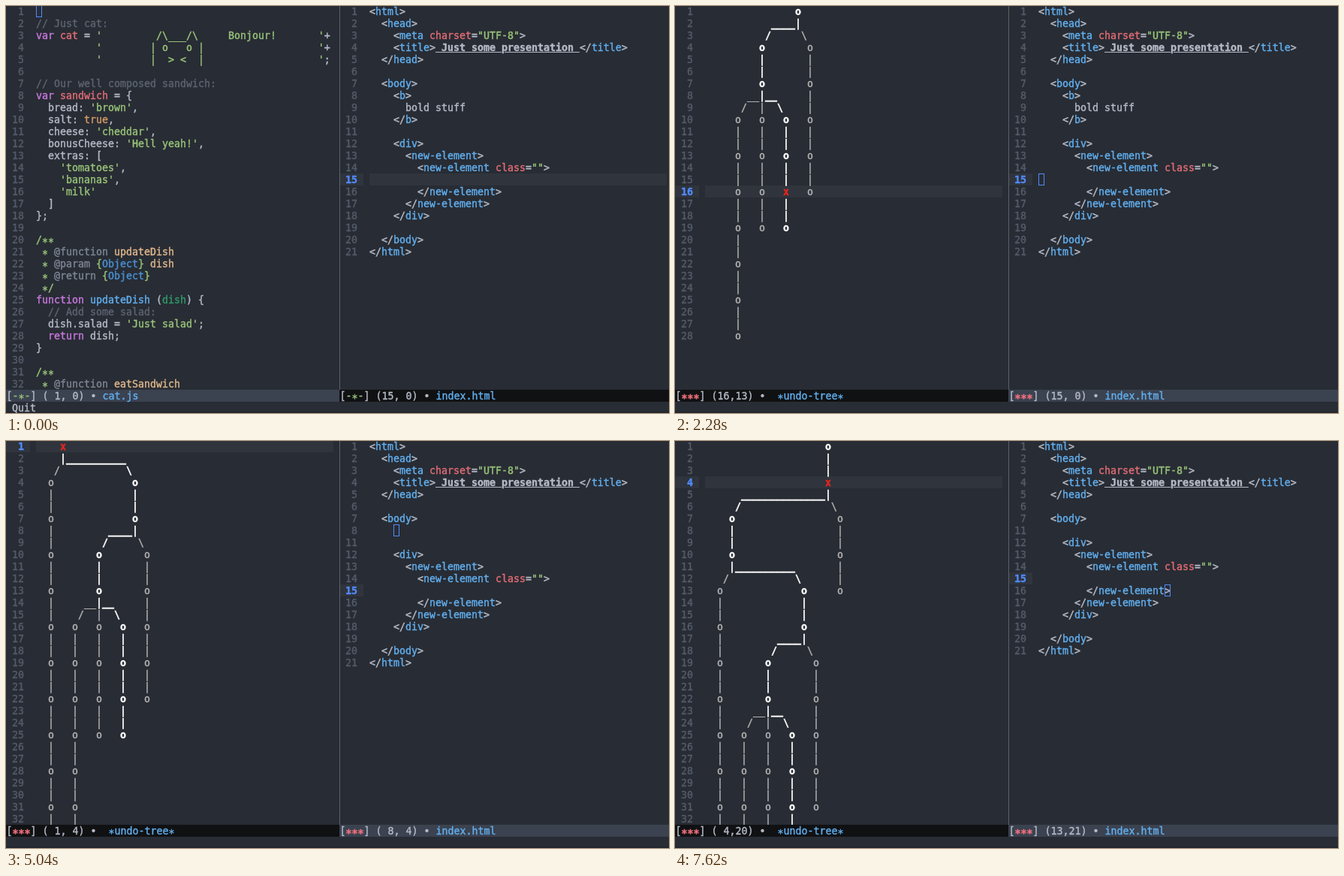
Recreate the animation shown at these times as an HTML page. Size 883 px wide and 542 px high, loop 8000 ms.

```html
<!DOCTYPE html>
<html lang="en">
<head>
<meta charset="UTF-8">
<title>Undo tree</title>
<style>
html, body { margin: 0; width: 100%; height: 100%; overflow: hidden; background: #282c34; }
#stage { position: relative; width: 883px; height: 542px; overflow: hidden; background: #282c34; }
pre, div div { position: absolute; margin: 0; box-sizing: border-box; }
pre {
  margin-top: 1px;
  font: 13.29px/16px "DejaVu Sans Mono", monospace;
  -webkit-text-stroke: 0.4px currentColor;
  font-variant-ligatures: none;
  color: #b4bac6;
}
i { position: relative; top: 3px; font-style: normal; }
.num { color: #535b69; }
.tree { color: #b3b3b3; }
.line { background: #2f343d; }
.on { background: #101113; }
.off { background: #3b4250; }
.rule { background: #5b606b; }
.edge { background: #22262d; }
.solid { background: #528bff; }
.hollow { border: 1px solid #528bff; }
.c { color: #5c6370; }
.k { color: #c678dd; }
.r { color: #e06c75; }
.R { color: #f0717c; font-weight: bold; }
.g { color: #98c379; }
.o { color: #d19a66; }
.d { color: #7d8594; }
.y { color: #dfb78c; }
.b { color: #4a8fd0; }
.f { color: #61afef; }
.p { color: #2f9a68; }
.u { font-weight: bold; text-decoration: underline; }
.n { color: #528bff; font-weight: bold; }
.w { color: #fff; font-weight: bold; }
.x { color: #e5261f; font-weight: bold; }
</style>
</head>
<body>
<div id="stage"></div>
<script>
// ~Xtext~ colours the text with class X
const SCRIPT = String.raw`
~c// Just cat:~
~kvar~ ~rcat~ = ~g'         /\___/\     Bonjour!       '~+
          ~g'        | o   o |                   '~+
          ~g'        |  > <  |                   '~;

~c// Our well composed sandwich:~
~kvar~ ~rsandwich~ = {
  bread: ~g'brown'~,
  salt: ~otrue~,
  cheese: ~g'cheddar'~,
  bonusCheese: ~g'Hell yeah!'~,
  extras: [
    ~g'tomatoes'~,
    ~g'bananas'~,
    ~g'milk'~
  ]
};

~g/**~
 ~g*~ ~d@function~ ~yupdateDish~
 ~g*~ ~d@param~ ~g{~~bObject~~g}~ ~ydish~
 ~g*~ ~d@return~ ~g{~~bObject~~g}~
 ~g*/~
~kfunction~ ~fupdateDish~ (~pdish~) {
  ~c// Add some salad:~
  dish.salad = ~g'Just salad'~;
  ~kreturn~ dish;
}

~g/**~
 ~g*~ ~d@function~ ~yeatSandwich~`;

const PAGE_TOP = `<html>
  <head>
    <meta charset="UTF-8">
    <title>~u Just some presentation ~</title>
  </head>

  <body>`.split('\n');

const PAGE_END = `
    <div>
      <new-element>
        <new-element class="">

        </new-element>
      </new-element>
    </div>

  </body>
</html>`.split('\n');

const LOOP = 8000, ROWS = 32;
const OPEN = '    <b>', CLOSE = '    </b>';

// Tree drawing on a character grid
let grid;

function put(row, col, text, cls = '') {
  if (row > ROWS) return;
  const line = grid[row - 1] ||= [];
  [...text].forEach((ch, i) => line[col + i] = cls ? `~${cls}${ch}~` : ch);
}

function chain(col, from, to, cls) {
  for (let r = from; r <= to; r++) put(r, col, (r - from) % 3 ? '|' : 'o', cls);
}

function lowTree(r, c = 0) {
  put(r + 1, c + 11, '____|', 'w');
  put(r + 2, c + 10, '/', 'w');
  put(r + 2, c + 16, '\\');
  chain(c + 9, r + 3, r + 6, 'w');
  chain(c + 17, r + 3, r + 15);
  put(r + 7, c + 7, '__');
  put(r + 7, c + 9, '|__', 'w');
  put(r + 8, c + 6, '/');
  put(r + 8, c + 9, '|');
  put(r + 8, c + 12, '\\', 'w');
  chain(c + 5, r + 9, r + 27);
  chain(c + 9, r + 9, r + 18);
  chain(c + 13, r + 9, r + 18, 'w');
}

function midTree(r) {
  put(r + 1, 4, '|' + '_'.repeat(10), 'w');
  put(r + 2, 3, '/');
  put(r + 2, 15, '\\', 'w');
  chain(2, r + 3, ROWS);
  chain(16, r + 3, r + 6, 'w');
  lowTree(r + 6, 1);
}

function highTree(r) {
  put(r + 1, 6, '_'.repeat(14) + '|', 'w');
  put(r + 2, 5, '/', 'w');
  put(r + 2, 21, '\\');
  chain(4, r + 3, r + 6, 'w');
  chain(22, r + 3, r + 9);
  midTree(r + 6);
}

const low = { draw: lowTree, col: 15 };
const mid = { draw: midTree, col: 4 };
const high = { draw: highTree, col: 20 };

function treeLines({ tree, top, mark }) {
  grid = [];
  tree.draw(top);
  chain(tree.col, 1, top, 'w');
  put(...mark, 'x', 'x');
  return grid.map(line => Array.from(line, ch => ch || ' ').join(''));
}

// Timeline: body = lines inside <body>, mark = x in the tree, point = cursor in the page
const full = [OPEN, '      bold stuff', CLOSE];
const step = (time, tree, top, mark, body, point, flag = '~R***~') =>
  ({ time, tree, top, mark, body, point, flag });
const states = [
  { time: 0, body: full, point: [15, 0], flag: '~g-*-~', quit: true },
  { time: 480, body: full, point: [15, 0], flag: '~g-*-~', quit: true, lit: true },
  { time: 780, body: full, point: [15, 0], flag: '~g-*-~', lit: true },
  step(960, low, 1, [19, 13], full, [15, 0], '~g-*-~'),
  step(2280, low, 1, [16, 13], full, [15, 0]),
  step(2580, low, 1, [13, 13], [OPEN, '', CLOSE], [9, 6]),
  step(2850, low, 1, [10, 13], ['    <>', '', CLOSE], [8, 5]),
  step(3000, low, 1, [7, 9], ['    <>', '', '    </>'], [8, 5]),
  step(3990, low, 1, [4, 9], ['    <'], [8, 4]),
  step(4380, low, 1, [1, 15], [''], [8, 4]),
  step(4650, low, 4, [1, 15], ['    <'], [8, 4]),
  step(5040, mid, 1, [1, 4], [''], [8, 4]),
  step(5430, mid, 4, [1, 4], [], [7, 8]),
  step(5940, high, 1, [1, 20], [], [11, 28]),
  step(6630, high, 4, [1, 20], [], [11, 29]),
  step(7620, high, 4, [4, 20], [], [13, 21]),
];

// Rendering
const rowY = row => 16 * row - 17;
const colour = s => s.replace(/~(.)(.*?)~/g, '<span class="$1">$2</span>').replace(/\*/g, '<i>*</i>');
const escape = s => s.replace(/</g, '&lt;');
const markup = s => escape(s)
  .replace(/(\w+)=("[^"]*")/g, '~r$1~=~g$2~')
  .replace(/(&lt;\/?)([\w-]+)/g, '$1~f$2~');
const text = (x, y, s, cls = '') =>
  `<pre class="${cls}" style="left:${x}px;top:${y}px">${colour(s)}</pre>`;
const box = (x, y, w, h, cls) =>
  `<div class="${cls}" style="left:${x}px;top:${y}px;width:${w}px;height:${h}px"></div>`;
const cursor = (x, [row, col], cls) => box(x + 8 * col, rowY(row), 8, 16, cls);
const lines = (x, list, cls) => list.map((s, i) => text(x, rowY(i + 1), s, cls)).join('');
const pad = n => String(n).padStart(2);
const numbers = (x, list, current) =>
  lines(x, list.map(n => n === current ? `~n${pad(n)}~` : pad(n)), 'num');
const count = (n, first = 1) => Array.from({ length: n }, (_, i) => first + i);
const status = (x, w, active, flag, [row, col], name) =>
  box(x, 511, w, 16, active ? 'on' : 'off') +
  text(x + 0.5, 511, `[${flag}] (${pad(row)},${pad(col)}) • ${name}`);

function leftPane(s) {
  if (!s.tree) {
    return numbers(8, count(ROWS)) + lines(40, escape(SCRIPT).split('\n')) +
      cursor(40, [1, 0], 'hollow') +
      status(0, 444, false, '~g-*-~', [1, 0], '~fcat.js~');
  }
  const list = treeLines(s), y = rowY(s.mark[0]);
  return box(0, y, 32, 16, 'line') + box(40, y, 396, 16, 'line') +
    numbers(8, count(list.length), s.mark[0]) + lines(40, list, 'tree') +
    status(0, 444, true, '~R***~', s.mark, ' ~f*undo-tree*~');
}

function rightPane(s) {
  const list = [...PAGE_TOP, ...s.body, ...PAGE_END];
  const labels = [...count(7 + s.body.length), ...count(11, 11)];
  const y = rowY(labels.indexOf(15) + 1);
  const kind = s.tree ? 'hollow' : s.lit ? 'solid' : '';
  return box(445, y, 31, 16, 'line') + (s.tree ? '' : box(484, y, 396, 16, 'line')) +
    numbers(452, labels, 15) + lines(484, list.map(markup)) +
    (kind && cursor(484, s.point, kind)) +
    status(444, 439, !s.tree, s.flag, s.point, '~findex.html~');
}

const stage = document.getElementById('stage');
let shown;

function frame() {
  const time = performance.now() % LOOP;
  const state = states.findLast(s => s.time <= time);
  if (state !== shown) {
    shown = state;
    stage.innerHTML = leftPane(state) + rightPane(state) +
      box(444, 0, 1, 511, 'rule') + box(0, 540, 883, 2, 'edge') +
      (state.quit ? text(8, 527, 'Quit') : '');
  }
  requestAnimationFrame(frame);
}
frame();
</script>
</body>
</html>
```
